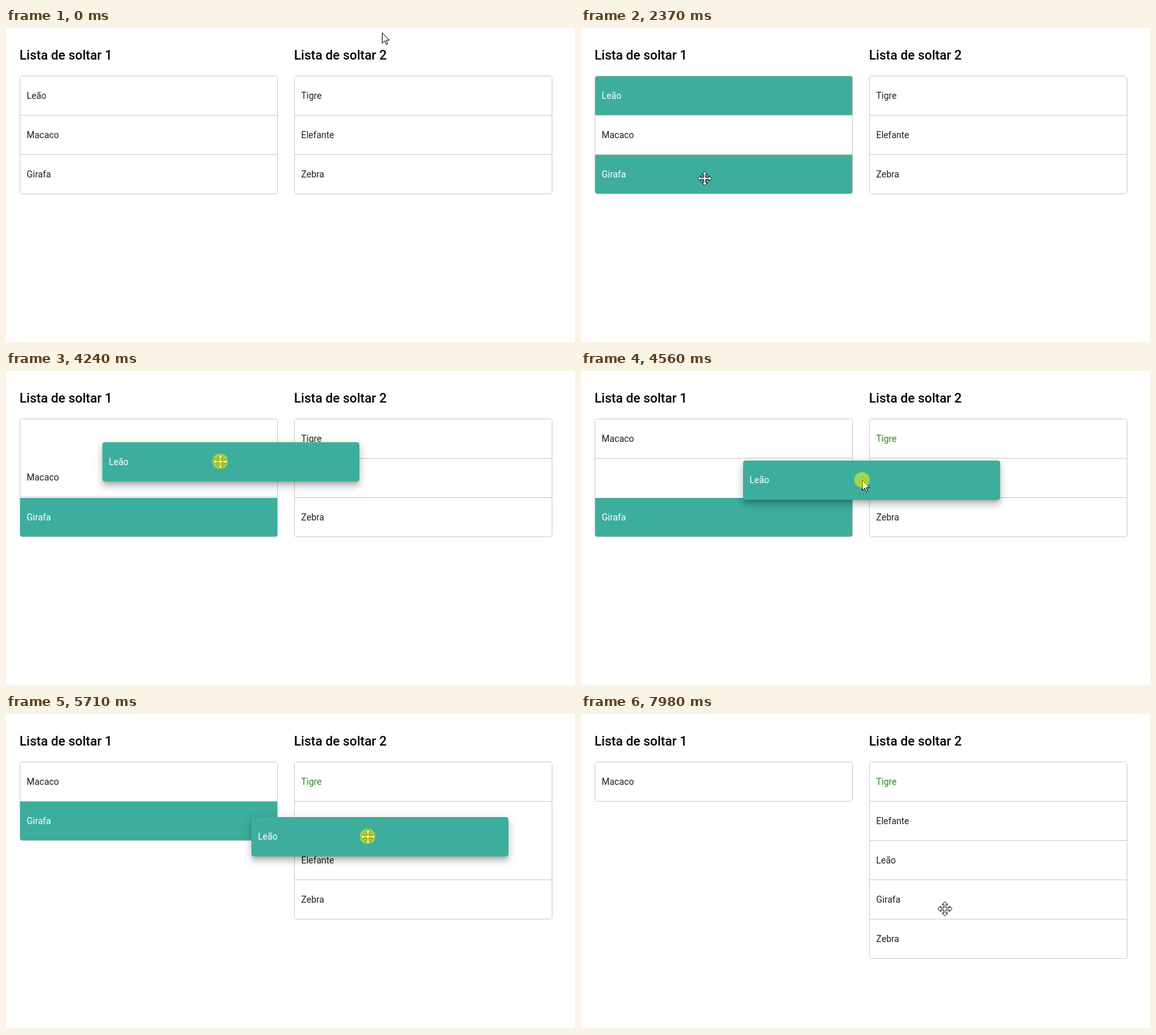
An HTML page that plays this animation: 881 px wide and 489 px high, repeating every 8000 ms.

```html
<!DOCTYPE html>
<html lang="pt">
<head>
<meta charset="utf-8">
<title>Listas de soltar</title>
<style>
  html, body { margin: 0; width: 100%; height: 100%; overflow: hidden; background: #fff; }
  body { position: relative; font: 14px/20px Roboto, sans-serif; color: rgba(0, 0, 0, .87); }
  body, .list, .row, .preview { --teal: #3dae9c; --slide: cubic-bezier(0, 0, .2, 1); }

  h2 { position: absolute; top: 26px; margin: 0; font: 500 20px/32px Roboto, sans-serif; color: #000; white-space: nowrap; }
  .first { left: 21px; }
  .second { left: 446px; }
  .floor { position: absolute; left: 0; top: 488px; width: 881px; height: 1px; background: #f0f0f0; }

  .list {
    position: absolute; top: 74px; width: 400px; height: 184px; box-sizing: border-box;
    border: 1px solid #ccc; border-radius: 4px; overflow: hidden; background: #fff;
  }
  .row, .preview { position: absolute; left: 0; width: 398px; height: 61px; box-sizing: border-box; padding: 20px 10px; }
  .row { top: calc(var(--slot) * 61px); border-bottom: 1px solid #ccc; background: #fff; }
  .preview {
    top: 0; border-radius: 4px; background: var(--teal); color: #fff;
    box-shadow: 0 5px 5px -3px rgba(0, 0, 0, .2), 0 8px 10px 1px rgba(0, 0, 0, .14), 0 3px 14px 2px rgba(0, 0, 0, .12);
  }
  .cursor { position: absolute; left: 0; top: 0; width: 0; height: 0; }
  .cursor svg { position: absolute; left: 0; top: 0; overflow: visible; }
  .cursor path { fill: #fff; stroke: #000; }
  .press { position: absolute; left: -12px; top: -12px; width: 24px; height: 24px; border-radius: 50%; background: rgba(255, 255, 0, .5); }

  /* Lists resize when the item changes list and again when it is dropped */
  .list.first { animation: shrink 8s infinite step-end; }
  .list.second { animation: grow 8s infinite step-end; }
  @keyframes shrink { 0% { height: 184px } 57.875% { height: 123px } 85.5%, 100% { height: 62px } }
  @keyframes grow { 0% { height: 184px } 57.875% { height: 245px } 85.5%, 100% { height: 306px } }

  .lion { animation: lion 8s infinite step-end; }
  @keyframes lion {
    0% { background: #fff; color: rgba(0, 0, 0, .87); visibility: visible }
    16.125% { background: var(--teal); color: #fff; visibility: visible }
    49%, 100% { background: var(--teal); color: #fff; visibility: hidden }
  }
  .monkey { animation: monkey 8s infinite var(--slide); }
  @keyframes monkey { 0%, 53% { transform: none } 56.125%, 100% { transform: translateY(-61px) } }

  .giraffe { animation: giraffe 8s infinite step-end; }
  @keyframes giraffe {
    0% { background: #fff; color: rgba(0, 0, 0, .87); transform: none; visibility: visible }
    28.875% { background: var(--teal); color: #fff; transform: none; visibility: visible }
    57.875% { background: var(--teal); color: #fff; transform: translateY(-61px); visibility: visible }
    85.5%, 100% { background: var(--teal); color: #fff; transform: translateY(-61px); visibility: hidden }
  }
  .tiger { animation: tiger 8s infinite step-end; }
  @keyframes tiger { 0% { color: rgba(0, 0, 0, .87) } 56%, 100% { color: #2f8427 } }

  .elephant { animation: elephant 8s infinite var(--slide); }
  @keyframes elephant {
    0%, 57.87% { transform: none }
    57.875%, 62.75% { transform: translateY(61px) }
    65.875%, 68.3% { transform: none }
    71.3%, 74.3% { transform: translateY(61px) }
    77.4%, 100% { transform: none }
  }
  .zebra { animation: zebra 8s infinite step-end; }
  @keyframes zebra {
    0% { transform: none }
    57.875% { transform: translateY(61px) }
    85.5%, 100% { transform: translateY(122px) }
  }
  .dropped { animation: dropped 8s infinite step-end; }
  @keyframes dropped { 0% { visibility: hidden } 85.5%, 100% { visibility: visible } }

  .preview { animation: drag 8s infinite step-end, held 8s infinite step-end; }
  @keyframes held { 0% { visibility: hidden } 49% { visibility: visible } 85.5%, 100% { visibility: hidden } }
  @keyframes drag {
    0% { transform: translate(22px, 75px) }
    48% { transform: translate(22px, 75px); animation-timing-function: steps(9) }
    57% { transform: translate(251px, 139px) }
    57.875% { transform: translate(277px, 149px); animation-timing-function: steps(6) }
    62.75% { transform: translate(368px, 166px); animation-timing-function: steps(5) }
    68.5% { transform: translate(386px, 172px); animation-timing-function: steps(3) }
    71.375% { transform: translate(380px, 160px) }
    73.375% { transform: translate(380px, 160px); animation-timing-function: steps(5) }
    78.375% { transform: translate(392px, 215px) }
    83.125% { transform: translate(425px, 205px) }
    84.25% { transform: translate(442px, 199px) }
    85%, 100% { transform: translate(447px, 197px) }
  }

  .cursor { animation: point 8s infinite steps(2); }
  @keyframes point {
    0% { transform: translate(582px, 7px) }
    1.875% { transform: translate(548px, 34px) }
    3.75% { transform: translate(455px, 84px) }
    5.625% { transform: translate(325px, 120px) }
    7.5% { transform: translate(222px, 128px) }
    9.375% { transform: translate(152px, 112px); animation-timing-function: step-end }
    10.25% { transform: translate(141px, 105px) }
    12.25% { transform: translate(138px, 105px) }
    17.0625% { transform: translate(138px, 105px); animation-timing-function: steps(6) }
    22.75% { transform: translate(191px, 233px) }
    32.6875% { transform: translate(191px, 233px); animation-timing-function: steps(5) }
    37.5% { transform: translate(214px, 165px); animation-timing-function: steps(5) }
    42.25% { transform: translate(202px, 104px) }
    48% { transform: translate(202px, 104px); animation-timing-function: steps(9) }
    57% { transform: translate(435px, 169px); animation-timing-function: step-end }
    57.875% { transform: translate(458px, 180px); animation-timing-function: steps(6) }
    62.75% { transform: translate(548px, 196px); animation-timing-function: steps(5) }
    68.5% { transform: translate(566px, 202px); animation-timing-function: steps(3) }
    71.375% { transform: translate(560px, 190px) }
    73.375% { transform: translate(560px, 190px); animation-timing-function: steps(5) }
    78.375% { transform: translate(572px, 245px) }
    83.125% { transform: translate(572px, 245px); animation-timing-function: steps(5) }
    88% { transform: translate(591px, 394px) }
    96% { transform: translate(591px, 394px); animation-timing-function: steps(4) }
    99.75%, 100% { transform: translate(563px, 302px) }
  }

  /* Arrow outside the lists, four-way cursor inside */
  .arrow { animation: arrow 8s infinite step-end; }
  .move { animation: move 8s infinite step-end; }
  @keyframes arrow {
    0%, 57%, 88% { visibility: visible }
    3.75%, 57.875%, 96.9375%, 100% { visibility: hidden }
  }
  @keyframes move {
    0%, 57%, 88% { visibility: hidden }
    3.75%, 57.875%, 96.9375%, 100% { visibility: visible }
  }
  .press { animation: press 8s infinite step-end; }
  @keyframes press {
    0%, 16.125%, 29.625%, 82.375%, 100% { visibility: hidden }
    13.25%, 26.75%, 48% { visibility: visible }
  }
</style>
</head>
<body>
  <h2 class="first">Lista de soltar 1</h2>
  <h2 class="second">Lista de soltar 2</h2>

  <div class="list first">
    <div class="row lion" style="--slot:0">Leão</div>
    <div class="row monkey" style="--slot:1">Macaco</div>
    <div class="row giraffe" style="--slot:2">Girafa</div>
  </div>

  <div class="list second">
    <div class="row tiger" style="--slot:0">Tigre</div>
    <div class="row elephant" style="--slot:1">Elefante</div>
    <div class="row zebra" style="--slot:2">Zebra</div>
    <div class="row dropped" style="--slot:2">Leão</div>
    <div class="row dropped" style="--slot:3">Girafa</div>
  </div>

  <div class="floor"></div>
  <div class="preview">Leão</div>

  <div class="cursor">
    <svg class="arrow" width="12" height="19"><path d="M.5.5V16.5L4.3 12.9 6.8 18.5 9 17.5 6.6 12H11.5Z"/></svg>
    <svg class="move" width="1" height="1"><path transform="translate(.5 .5)" d="M0-11L4.5-6.5H1.5V-1.5H6.5V-4.5L11 0 6.5 4.5V1.5H1.5V6.5H4.5L0 11-4.5 6.5H-1.5V1.5H-6.5V4.5L-11 0-6.5-4.5V-1.5H-1.5V-6.5H-4.5Z"/></svg>
    <div class="press"></div>
  </div>
</body>
</html>
```
